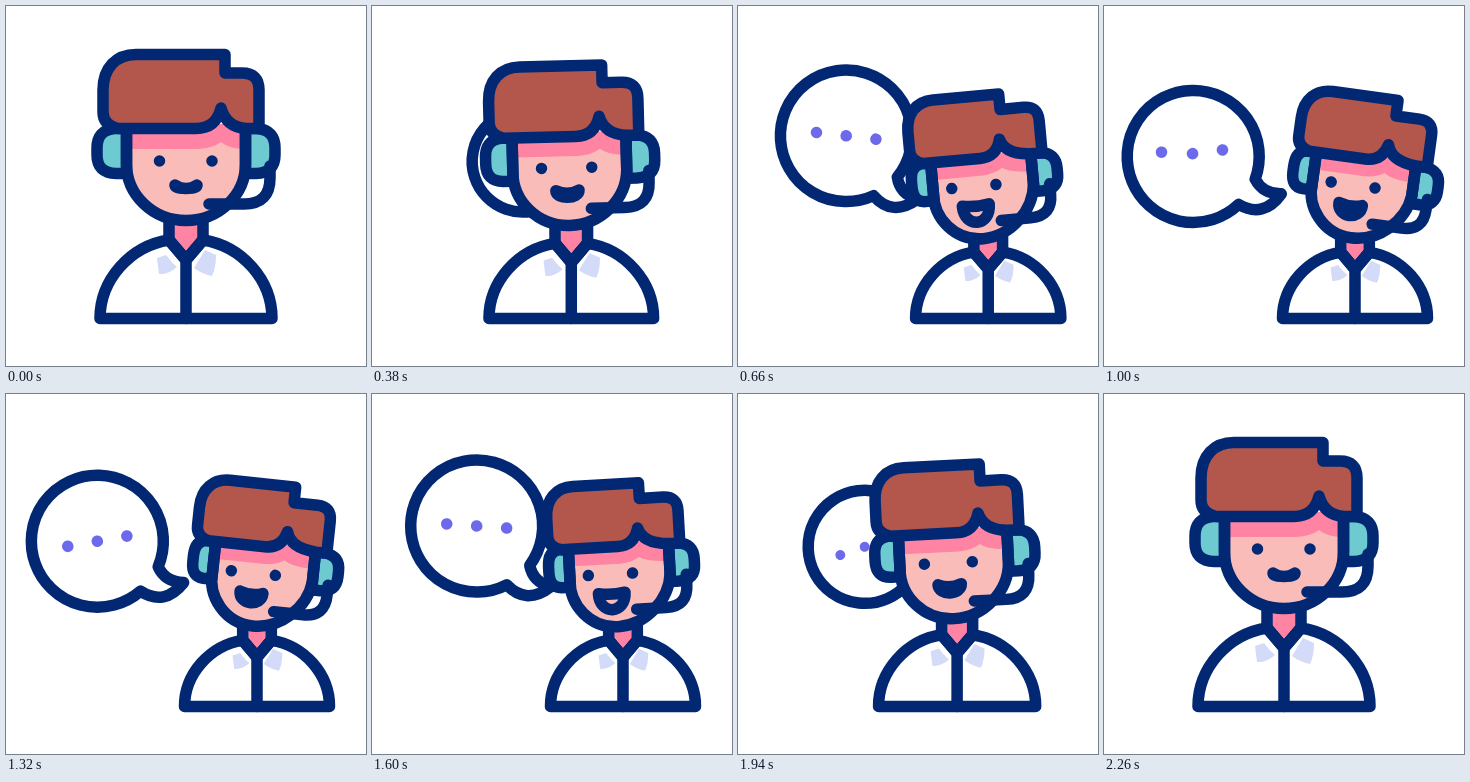
Animation, 360 px wide and 360 px high, one loop 2.4 s. Source, as an HTML page:

```html
<!DOCTYPE html>
<html lang="en">
<head>
<meta charset="utf-8">
<title>Support agent</title>
<style>
  html, body { margin: 0; width: 100%; height: 100%; overflow: hidden; background: #fff; }
  svg { display: block; width: 100%; height: 100%; }
  .line { fill: none; stroke: #022873; stroke-linecap: round; stroke-linejoin: round; }
  .white { fill: #fff; }
  .skin { fill: #fabcb9; }
  .pink { fill: #ff83a2; }
  .hair { fill: #b3574d; }
  .teal { fill: #6ccad0; }
  .cloth { fill: #d3dbf8; }
  .dot { fill: #6c6aeb; }
</style>
</head>
<body>
<svg viewBox="0 0 360 360">
  <g id="bubble">
    <path class="line white" d="M55.6 35.6A66 66 0 1 0 34 56.6Q55 76 78 55.5Q60 52 55.6 35.6Z"/>
    <g id="dots">
      <circle class="dot" cx="-30" r="5.8"/>
      <circle class="dot" cx="0" r="5.8"/>
      <circle class="dot" cx="30" r="5.8"/>
    </g>
  </g>
  <g id="agent">
    <path class="line pink" d="M163 205V234L180 254L197 234V205Z"/>
    <path class="line white" d="M94 312.5C94 274 124 240 163 234L180 254L197 234C236 240 266 274 266 312.5Z"/>
    <path class="cloth" d="M151 252L160 249Q166 257 171 261Q162 269 153 268Z"/>
    <path class="cloth" d="M199 244L210 249Q210 262 206 270Q196 268 188 262Z"/>
    <path class="line" d="M163 234L180 254L197 234M180 254V312.5"/>
    <g id="head">
      <path class="skin" id="skin"/>
      <path class="pink" id="shade"/>
      <path class="line teal" id="ear"/>
      <path class="line teal" d="M239.5 122.5H251Q269 124 269 142V149Q269 167 250 167.5H239.5Z"/>
      <path class="line" id="jaw"/>
      <g id="face">
        <path class="line" d="M153.5 155h0M206 155h0"/>
        <path class="line skin" id="mouth"/>
      </g>
      <path class="line" id="mic" d="M264 160V172Q264 198 238 198H203"/>
      <path class="line hair" id="hair"/>
    </g>
  </g>
</svg>
<script>
const LOOP = 2400, STROKE = 11.5;
const el = id => document.getElementById(id);
const set = (id, name, value) => el(id).setAttribute(name, value);
const clamp = x => Math.min(1, Math.max(0, x));
const mix = (a, b, u) => a + (b - a) * u;

// 0 before `from`, 1 after `to`, smooth between
function ease(t, from, to) {
  const x = clamp((t - from) / (to - from));
  return x * x * (3 - 2 * x);
}

// Scales a group while its lines keep their weight.
function place(id, transform, scale) {
  set(id, 'transform', `${transform} scale(${scale})`);
  set(id, 'stroke-width', STROKE / scale);
}

const hairPath = s =>
  `M112 122.5Q97 119 97 106V84C97 62 110 48.5 130 48.5H${219 + s}V67H236Q253 67 253 84V122.5H240`
  + `Q${220 + s} 121 ${215 + s} 102Q${210 + s} 122.5 ${190 + s} 122.5Z`;

const shadePath = s =>
  `M124 118V143H${192 + s}Q${207 + s} 142 ${215 + s} 136Q${222 + s} 142 236 143V118Z`;

const jawPath = (dx, dy) =>
  `M120.5 118V158C${120.5 + dx / 2} 189 ${147 + dx} ${214.5 + dy} ${180 + dx} ${214.5 + dy}`
  + `S${239.5 + dx / 2} 189 239.5 158V118`;

const earPath = x =>
  `M120.5 122.5H109Q${x} 124 ${x} 142V149Q${x} 167 110 167.5H120.5Z`;

function mouthPath(open) {
  const half = 11 + 5 * open, top = 179 - 2 * open;
  const l = 180 - half, r = 180 + half;
  const low = top + (3.5 + 17 * open) * 4 / 3;
  return `M${l} ${top}Q180 ${top + 7 - 4 * open} ${r} ${top}C${r} ${low} ${l} ${low} ${l} ${top}Z`;
}

function drawAgent(t, away, swing) {
  const turn = -11 * away;
  const scale = 1 - .157 * away;
  const talk = Math.sqrt(away) * (.7 + .3 * Math.cos(2 * Math.PI * (t - 660) / 490));
  const jaw = jawPath(turn / 2, 3 * away);

  place('agent', `translate(${180 + 71 * away} 312.5)`, scale);
  el('agent').transform.baseVal.appendItem(shift(-180, -312.5));
  set('head', 'transform', `rotate(${away * (15.5 * swing - 5.3)} 180 220)`);
  set('face', 'transform', `translate(${turn} 0)`);
  set('mic', 'transform', `translate(${turn / 2} 0)`);
  set('hair', 'd', hairPath(turn));
  set('shade', 'd', shadePath(turn));
  set('skin', 'd', jaw);
  set('jaw', 'd', jaw);
  set('ear', 'd', earPath(91 - turn * .45));
  set('mouth', 'd', mouthPath(talk));
}

function shift(x, y) {
  const move = document.querySelector('svg').createSVGTransform();
  move.setTranslate(x, y);
  return move;
}

// The bubble slides out from behind the head and rocks about its tail.
function drawBubble(t, away, swing) {
  const angle = 7 - 23 * swing - 57 * (1 - away);
  const a = angle * Math.PI / 180, c = Math.cos(a), s = Math.sin(a);
  const x = mix(178, 161 - 60.5 * c + 59 * s, away);
  const y = mix(146, 195 - 60.5 * s - 59 * c, away);

  place('bubble', `translate(${x} ${y}) rotate(${angle})`, .68 + .32 * away);
  set('bubble', 'visibility', away > 0 ? 'visible' : 'hidden');
  [...el('dots').children].forEach((dot, i) => {
    const hop = Math.sin(Math.PI * clamp((t - 880 - 80 * i) / 240));
    dot.setAttribute('cy', -11 * hop * hop);
  });
}

function draw(t) {
  const away = ease(t, 220, 690) * (1 - ease(t, 1715, 2200));
  const swing = ease(t, 700, 1100) * (1 - ease(t, 1100, 1750));
  drawAgent(t, away, swing);
  drawBubble(t, away, swing);
}

const start = performance.now();
function frame() {
  draw((performance.now() - start) % LOOP);
  requestAnimationFrame(frame);
}
frame();
</script>
</body>
</html>
```
